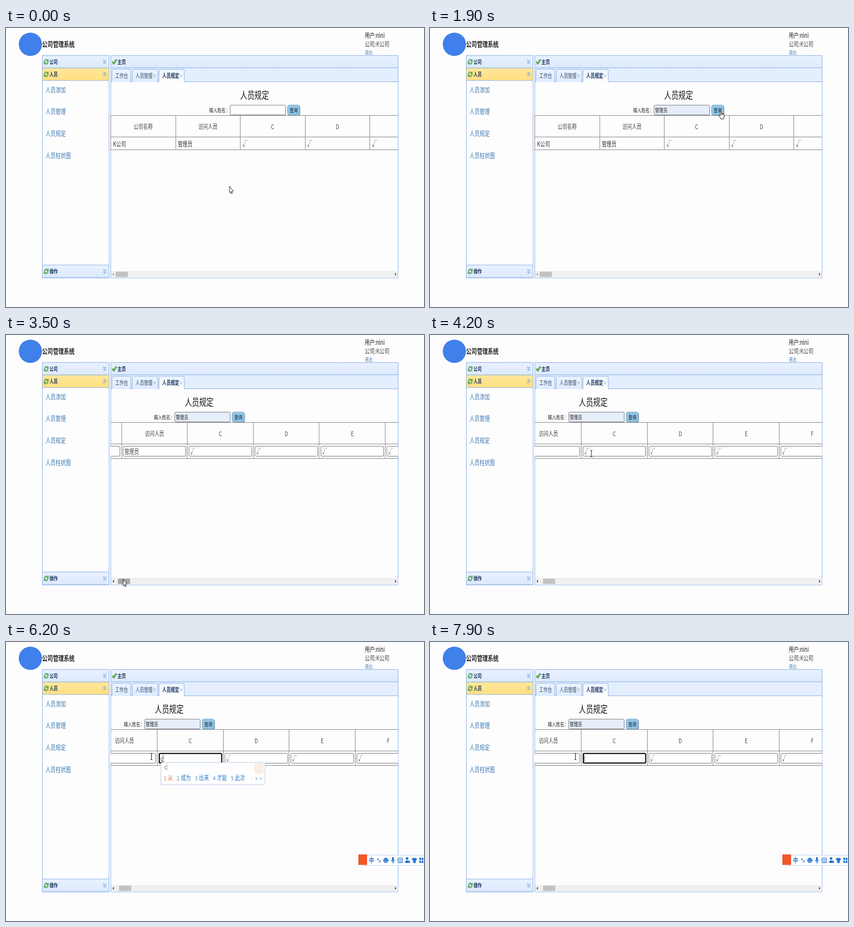
Recreate the animation shown at these times as an HTML page with a canvas. Size 720 px wide and 480 px high, loop 8 s.

```html
<!DOCTYPE html>
<html lang="zh-CN">
<head>
<meta charset="utf-8">
<title>公司管理系统</title>
<style>
html, body { margin: 0; width: 720px; height: 480px; overflow: hidden; background: #fefdfe; }
canvas { display: block; }
</style>
</head>
<body>
<canvas id="stage" width="720" height="480"></canvas>
<script>
const ctx = document.getElementById('stage').getContext('2d');
const LOOP = 8000, STEP = 100;
const SQUEEZE = 0.75;
const FONT = '"Noto Sans CJK SC", "Noto Sans CJK", "Noto Sans", sans-serif';
const BLUE = '#95b8e7', LINK = '#3a78b0', PAGE = '#fefdfe', IME = '#1a6fd0';

// Moments when something switches, in ms
const T = {
  focusName: 800, fillName: 1300, blurName: 1800, editable: 2300,
  dragFrom: 3200, dragTo: 3700, focusCell: 4500, select: 4900, erase: 5800
};
const MAX_SCROLL = 147;
// time, x, y of the pointer
const PATH = [
  [0, 385, 272], [300, 385, 272], [700, 440, 142], [1300, 440, 142], [1700, 500, 142],
  [2300, 500, 142], [3000, 198, 420], [3200, 198, 420], [3700, 204, 420],
  [4200, 278, 204], [4600, 276, 202], [5100, 250.5, 197], [LOOP, 250.5, 197]
];
// time, composed letters
const TYPING = [[5900, 'c'], [6300, 'cu'], [7300, 'c'], [7500, '']];
const CANDIDATES = { c: '从 成为 出来 才能 此次', cu: '粗 醋 促 簇 蹙' };

const ease = p => p * p * (3 - 2 * p);
const clamp = p => Math.max(0, Math.min(1, p));

function pointerAt(t) {
  let i = 0;
  while (i < PATH.length - 2 && t >= PATH[i + 1][0]) i++;
  const [t0, x0, y0] = PATH[i], [t1, x1, y1] = PATH[i + 1];
  const p = ease(clamp((t - t0) / (t1 - t0)));
  return { x: x0 + (x1 - x0) * p, y: y0 + (y1 - y0) * p };
}

function typedAt(t) {
  let s = '';
  for (const [at, letters] of TYPING) if (t >= at) s = letters;
  return s;
}

function text(s, x, y, size, color = '#333', weight = 400, align = 'left') {
  ctx.save();
  ctx.translate(x, y);
  ctx.scale(SQUEEZE, 1);
  ctx.font = `${weight} ${size}px ${FONT}`;
  ctx.textAlign = align;
  ctx.textBaseline = 'middle';
  ctx.fillStyle = color;
  ctx.fillText(s, 0, 0);
  ctx.restore();
}

function rect(x, y, w, h, fill) {
  ctx.fillStyle = fill;
  ctx.fillRect(x, y, w, h);
}

function box(x, y, w, h, r, fill, stroke, width = 1) {
  ctx.beginPath();
  ctx.roundRect(x, y, w, h, r);
  if (fill) { ctx.fillStyle = fill; ctx.fill(); }
  if (stroke) { ctx.strokeStyle = stroke; ctx.lineWidth = width; ctx.stroke(); }
}

function line(points, color, width = 1) {
  ctx.beginPath();
  for (let i = 0; i < points.length; i += 2) ctx.lineTo(points[i], points[i + 1]);
  ctx.strokeStyle = color;
  ctx.lineWidth = width;
  ctx.stroke();
}

function poly(points, fill, stroke) {
  ctx.beginPath();
  for (let i = 0; i < points.length; i += 2) ctx.lineTo(points[i], points[i + 1]);
  ctx.closePath();
  if (fill) { ctx.fillStyle = fill; ctx.fill(); }
  if (stroke) { ctx.strokeStyle = stroke; ctx.lineWidth = 0.9; ctx.stroke(); }
}

function disc(x, y, r, fill) {
  ctx.beginPath();
  ctx.arc(x, y, r, 0, 7);
  ctx.fillStyle = fill;
  ctx.fill();
}

function shade(y, h, top, bottom) {
  const g = ctx.createLinearGradient(0, y, 0, y + h);
  g.addColorStop(0, top);
  g.addColorStop(1, bottom);
  return g;
}

function reloadIcon(x, y) {
  for (const side of [-1, 1]) {
    ctx.save();
    ctx.translate(x, y);
    ctx.scale(side * 0.8, side);
    ctx.beginPath();
    ctx.arc(0, 0, 3.6, Math.PI * 0.95, Math.PI * 1.75);
    ctx.strokeStyle = '#4c9a48';
    ctx.lineWidth = 2.4;
    ctx.stroke();
    ctx.strokeStyle = '#a5d79a';
    ctx.lineWidth = 0.8;
    ctx.stroke();
    poly([0.5, -0.6, 5, -0.6, 5, -5], '#4c9a48');
    ctx.restore();
  }
}

function chevrons(x, y, dir) {
  for (const dy of [-2, 1.6])
    line([x - 2.5, y + dy - dir * 1.2, x, y + dy + dir * 1.2, x + 2.5, y + dy - dir * 1.2], '#7ba7dd', 1.2);
}

function sideHeader(label, y, open) {
  box(62.5, y, 115, 21.5, 0,
    open ? shade(y, 21, '#ffe79a', '#ffdf83') : shade(y, 21, '#e9f1ff', '#dde9fd'), BLUE);
  reloadIcon(69.3, y + 11);
  text(label, 75, y + 11, 9.4, '#17335e', 700);
  chevrons(170, y + 11, open ? -1 : 1);
}

function sidebar() {
  box(62.5, 47.5, 115, 382.5, 0, PAGE, BLUE);
  sideHeader('公司', 47.2, false);
  sideHeader('人员', 68.8, true);
  sideHeader('操作', 407.8, false);
  ['人员添加', '人员管理', '人员规定', '人员柱状图'].forEach((s, i) =>
    text(s, 68, 106.3 + i * 37.6, 11.7, LINK));
}

function tab(label, x, w, close, active) {
  ctx.beginPath();
  ctx.moveTo(x, 93);
  ctx.lineTo(x, 74);
  ctx.quadraticCurveTo(x, 71, x + 3, 71);
  ctx.lineTo(x + w - 3, 71);
  ctx.quadraticCurveTo(x + w, 71, x + w, 74);
  ctx.lineTo(x + w, 93);
  ctx.fillStyle = active ? shade(71, 22, '#edf4ff', PAGE) : shade(71, 22, '#edf4ff', '#dfebff');
  ctx.fill();
  ctx.strokeStyle = BLUE;
  ctx.lineWidth = 1;
  ctx.stroke();
  text(label, x + 5.6, 82, 9.75, active ? '#17335e' : '#2d4566', active ? 700 : 400);
  if (close) text('×', x + w - 5.5, 82, 8.5, '#7890b0', 400, 'center');
}

function mainFrame() {
  box(180.5, 47.5, 495, 382.5, 0, PAGE, BLUE);
  box(180.5, 47.5, 495, 21, 0, shade(48, 20, '#e9f1ff', '#dde9fd'), BLUE);
  line([183.3, 58, 185.6, 61, 190.3, 54], '#3c8e35', 2.6);
  line([183.6, 58, 185.6, 60.4, 190, 54.3], '#79c463', 1.1);
  text('主页', 192, 58, 9.6, '#17335e', 700);
  rect(181, 69, 494, 24, '#e4eefe');
  line([181, 92.5, 675, 92.5], BLUE);
  tab('工作台', 182.5, 32.5, false, false);
  tab('人员管理', 217.5, 44, true, false);
  tab('人员规定', 263.5, 43.5, true, true);
}

function field(x, y, w, h, fill, focused) {
  box(x, y, w, h, 1.5, fill, focused ? '#101116' : '#858589', focused ? 2 : 1);
}

function searchForm(t) {
  text('人员规定', 428, 116.2, 16.5, '#111', 400, 'center');
  text('输入姓名：', 350, 141, 9.4, '#222');
  const focused = t >= T.focusName && t < T.blurName;
  const filled = t >= T.fillName;
  field(386, 132.8, 95.5, 16.7, filled ? '#e6eefc' : '#fff', focused);
  if (filled) text('管理员', 387.7, 141.2, 9.5, '#222');
  else if (focused) line([388.5, 136, 388.5, 146.5], '#222', 0.8);
  box(485.6, 133.2, 21, 17.4, 3.5, '#54788c');
  box(484.8, 132.4, 21, 17.2, 3.5, '#92c5e6', '#78abc9', 0.8);
  text('查询', 495.6, 141.2, 9.6, '#152433', 400, 'center');
}

function table(t) {
  const edit = t >= T.editable;
  const pitch = edit ? 113.6 : 111.5, bottom = edit ? 212.5 : 209.5;
  const heads = ['公司名称', '访问人员', 'C', 'D', 'E', 'F', 'G'];
  const ink = '#929295';
  const end = 180.5 + heads.length * pitch;
  for (const y of [150.5, 187.5, bottom]) line([180.5, y, end, y], ink);
  for (let i = 0; i <= heads.length; i++) {
    const x = Math.round(180 + i * pitch) + 0.5;
    line([x, 150, x, bottom], ink);
  }
  heads.forEach((head, i) => {
    const x = 180.5 + i * pitch;
    text(head, x + pitch / 2, 170, 11, '#444', 400, 'center');
    const value = ['K公司', '管理员'][i] || '√';
    if (!edit) text(value, x + 4, 199.3, 11.1, '#333');
    else if (i === 2 && t >= T.focusCell) activeCell(t, x, value);
    else {
      field(x + 2.8, 191.5, 108, 17, '#fff');
      text(value, x + 5.2, 200.5, 11.1, '#444');
    }
  });
}

function activeCell(t, x, value) {
  const left = x + 5.2;
  field(x + 3.3, 191.8, 107.5, 16.4, '#fff', true);
  if (t < T.erase) {
    const selected = t >= T.select;
    if (selected) rect(left, 193.5, 8, 13.5, '#2f7be0');
    text(value, left, 200.5, 11.1, selected ? '#fff' : '#444');
    if (!selected) line([left + 8.5, 194.5, left + 8.5, 206], '#222', 0.8);
    return;
  }
  const typed = typedAt(t);
  text(typed, left, 200.5, 11.1, '#444');
  const end = left + (typed ? typed.length * 4.7 : 0.3);
  if (typed) line([left, 206.5, end, 206.5], '#444', 0.7);
  line([end, 194.5, end, 206], '#333', 0.8);
}

function scrollbar(t, scroll) {
  rect(181, 418, 494.5, 11.5, '#f0eff1');
  const x = 189 + scroll / MAX_SCROLL * 5.8;
  const held = t >= T.dragFrom - 200 && t <= T.dragTo;
  rect(x, 419.2, 20.8, 9.2, held ? '#a5a5a7' : '#c2c2c4');
  poly([183.4, 423.7, 186, 421.2, 186, 426.2], scroll ? '#4a4a4d' : '#a0a0a4');
  poly([672.5, 423.7, 670, 421.2, 670, 426.2], '#4a4a4d');
}

function inputBar() {
  box(612, 366.8, 120, 17.5, 3, '#fff', '#c3d9f2');
  rect(607, 365.5, 15, 18, '#f0582a');
  text('中', 629.7, 375.7, 11, IME, 700, 'center');
  disc(640.7, 374, 1.3, IME);
  line([644.2, 375.5, 644.2, 377.2, 643, 379], IME, 1.5);

  disc(654.3, 375.6, 4.3, IME);
  disc(652.8, 374.2, 0.8, '#fff');
  disc(655.8, 374.2, 0.8, '#fff');
  ctx.beginPath();
  ctx.arc(654.3, 376.2, 2.1, 0.1, Math.PI - 0.1);
  ctx.strokeStyle = '#fff';
  ctx.lineWidth = 0.9;
  ctx.stroke();

  box(664.9, 370, 3.2, 7, 1.6, IME);
  ctx.beginPath();
  ctx.arc(666.5, 375.2, 3.1, 0, Math.PI);
  ctx.strokeStyle = IME;
  ctx.lineWidth = 1;
  ctx.stroke();
  line([666.5, 378, 666.5, 381], IME, 1.2);

  box(675, 371.8, 8, 7.8, 1, null, IME, 1.1);
  for (const y of [374.3, 377]) line([676.3, y, 681.8, y], IME, 1);

  disc(690.8, 372.5, 2.3, IME);
  poly([687.2, 380, 688.2, 376.2, 693, 375.8, 693, 380], IME);
  rect(693.2, 376.5, 2.6, 3.6, IME);

  poly([699, 373, 702, 371, 703.5, 372.5, 705, 371, 708, 373, 706.8, 375.7, 705.7, 375.2,
    705.7, 380.2, 701.3, 380.2, 701.3, 375.2, 700.2, 375.7], IME);
  for (const dx of [0, 4]) for (const dy of [0, 5]) box(711.8 + dx, 371.2 + dy, 3.2, 3.8, 0.8, IME);
}

function popup(typed) {
  const words = CANDIDATES[typed].split(' ');
  const right = 411 + (words.join('').length - 5) * 8.75;
  ctx.save();
  ctx.shadowColor = 'rgba(60,90,130,.25)';
  ctx.shadowBlur = 3;
  box(267, 207.5, right - 267, 37.5, 1.5, '#fff');
  ctx.restore();
  box(267, 207.5, right - 267, 37.5, 1.5, null, '#c0d8ef', 0.9);
  box(right - 18, 208.5, 16, 18, 2, '#f8eee6');
  text(typed, 272.7, 215.3, 10.8, '#2b78c8');
  const caret = 273 + typed.length * 4.2;
  line([caret, 209.5, caret, 221], '#f09a50', 0.9);
  let x = 272;
  words.forEach((word, i) => {
    const color = i ? '#2b78c8' : '#f05a28';
    text(String(i + 1), x, 234.2, 9.5, color);
    text(word, x + 6.7, 234, 11.4, color, 500);
    x += 14 + word.length * 8.55;
  });
  line([right - 21, 232.5, right - 22.8, 235, right - 21, 237.5], '#d5e2f0', 1);
  line([right - 16, 232.5, right - 14, 235, right - 16, 237.5], '#4e86c4', 1);
  line([right - 9.2, 233.8, right - 7.2, 236.2, right - 5.2, 233.8], '#4e86c4', 1);
}

function pointerShape(t, p, scroll) {
  const x = p.x + scroll;
  if (p.y > 132 && p.y < 150) {
    if (x > 386 && x < 482) return 'beam';
    if (x > 485 && x < 507) return 'hand';
  }
  if (t >= T.editable && p.y > 191 && p.y < 209) {
    const inCell = (x - 180.5) % 113.6;
    if (inCell > 2.8 && inCell < 111) return 'beam';
  }
  return 'arrow';
}

function pointer(t, scroll) {
  const p = pointerAt(t), shape = pointerShape(t, p, scroll);
  ctx.save();
  ctx.translate(p.x, p.y);
  if (shape === 'arrow') {
    poly([0, 0, 0, 11.5, 2, 9.6, 3.5, 13.2, 5, 12.4, 3.6, 9, 6.2, 8.6], '#fff', '#222');
  } else if (shape === 'beam') {
    line([-1.8, -5.3, 1.8, -5.3], '#333', 0.9);
    line([-1.8, 5.3, 1.8, 5.3], '#333', 0.9);
    line([0, -5.3, 0, 5.3], '#333', 1);
  } else {
    poly([0, 0.6, 1, 0, 2, 0.8, 2, 5, 4, 5.2, 6.4, 6.4, 7, 8, 6, 12, 5.6, 14.5, 1, 14.5,
      0, 12, -2.4, 9, -2.2, 7.8, -1, 8, 0, 9], '#fff', '#222');
    for (const dx of [2, 3.7, 5.3]) line([dx, 5.3, dx, 8], '#222', 0.7);
  }
  ctx.restore();
}

function draw(t) {
  const scroll = MAX_SCROLL * ease(clamp((t - T.dragFrom) / (T.dragTo - T.dragFrom)));
  rect(0, 0, 720, 480, PAGE);
  disc(42, 28, 20, '#3f80ea');
  text('公司管理系统', 62.3, 28.7, 12.4, '#222', 700);
  text('用户:nini', 618, 12.3, 11.3, '#222');
  text('公司:K公司', 618, 28, 11.5, '#444');
  text('退出', 618.3, 41.3, 8.5, LINK);
  sidebar();
  mainFrame();

  ctx.save();
  ctx.beginPath();
  ctx.rect(180, 93, 495.5, 325);
  ctx.clip();
  ctx.translate(-scroll, 0);
  searchForm(t);
  table(t);
  ctx.restore();

  scrollbar(t, scroll);
  if ((t >= T.focusName && t < T.blurName) || t >= T.focusCell) inputBar();
  const typed = typedAt(t);
  if (typed) popup(typed);
  pointer(t, scroll);
}

const start = performance.now();
function tick() {
  const t = (performance.now() - start) % LOOP;
  draw(Math.floor(t / STEP) * STEP);
  requestAnimationFrame(tick);
}
tick();
</script>
</body>
</html>
```
